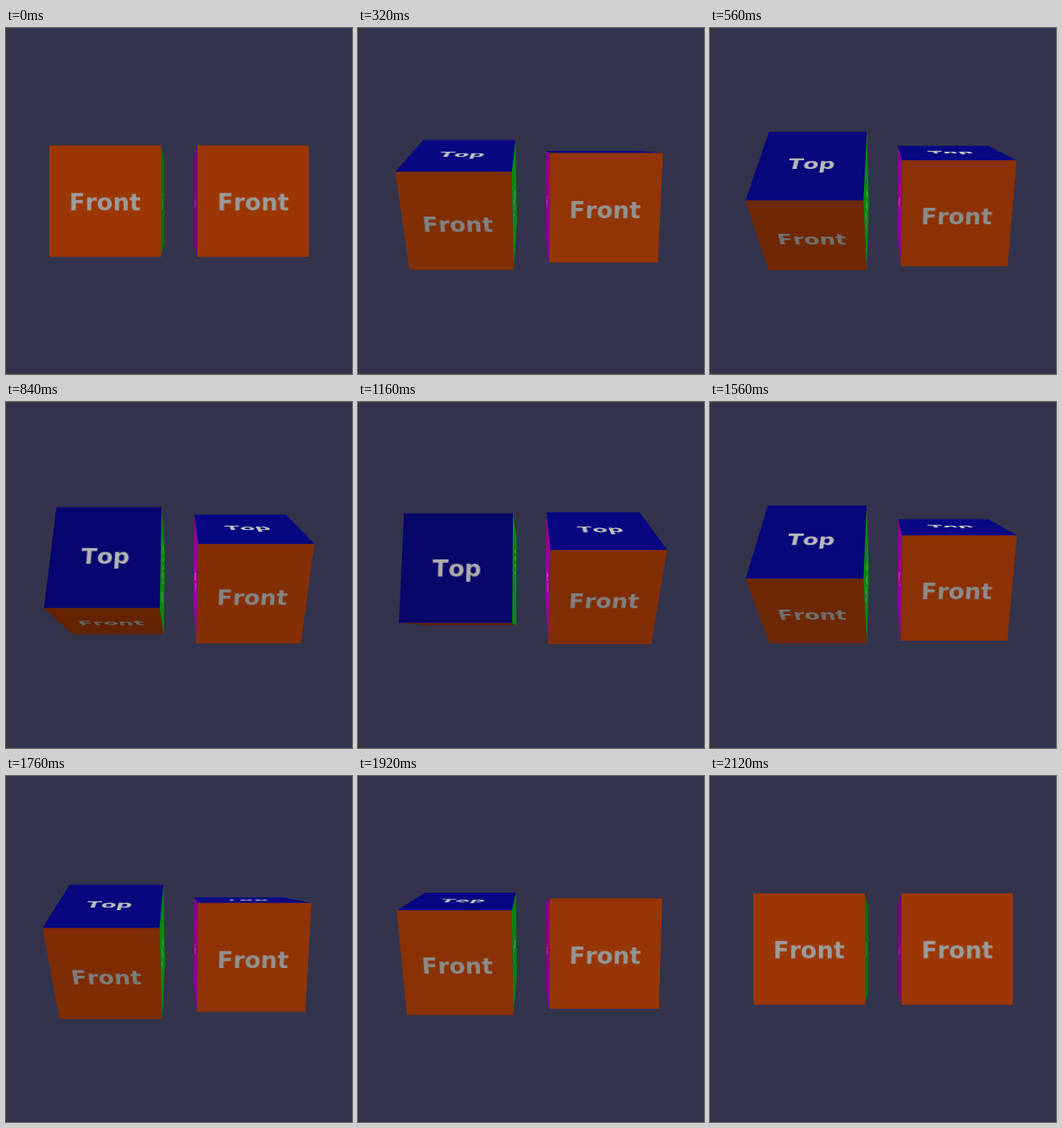
An HTML page for the animation above (2160 ms loop, 400 by 400 pixels).

```html
<!DOCTYPE html>
<html lang="en">
<head>
<meta charset="utf-8">
<title>Tilting cubes</title>
<style>
html, body { margin: 0; width: 100%; height: 100%; overflow: hidden; background: #33334c; }
#stage { position: absolute; left: 0; top: 0; width: 400px; height: 400px; overflow: hidden; perspective: 473.04px; }
.cube { position: absolute; left: 136px; top: 136px; width: 128px; height: 128px; transform-style: preserve-3d; }
.face {
  position: absolute; left: 0; top: 0; width: 128px; height: 128px;
  backface-visibility: hidden; text-align: center; white-space: nowrap;
  font: bold 27px/131px "DejaVu Sans", Verdana, sans-serif;
  font-kerning: none;
}
</style>
</head>
<body>
<div id="stage"></div>
<script>
const LOOP = 2160, STEP = 40;
const START = 38, PEAK = 1076, END = 2114, MAX_TILT = 89;
const GAP = 256 / 3, DEPTH = -62, HALF = 64;

// Brightness of each face and its label for the sine and cosine of the tilt
const frontLight = s => 0.61 - 0.24 * s;
const sideLight = s => 0.61 + 0.14 * Math.min(1, s / 0.35);
const FACES = [
  { label: 'Front', turn: '', rgb: [255, 90, 8], light: frontLight, ink: frontLight, alpha: 1 },
  { label: 'Top', turn: 'rotateX(90deg)', rgb: [10, 9, 160],
    light: (s, c) => 0.63 + 0.2 * c, ink: (s, c) => 0.66 + 0.1 * c, alpha: 1 },
  { label: 'Right', turn: 'rotateY(90deg)', rgb: [10, 182, 14], light: sideLight, ink: sideLight, alpha: 0.4 },
  { label: 'Left', turn: 'rotateY(-90deg)', rgb: [202, 0, 205], light: sideLight, ink: sideLight, alpha: 0.4 }
];

const stage = document.getElementById('stage');

function add(parent, name) {
  const el = document.createElement('div');
  el.className = name;
  return parent.appendChild(el);
}

function makeCube(x, share) {
  const el = add(stage, 'cube');
  const faces = FACES.map(f => {
    const face = add(el, 'face');
    face.textContent = f.label;
    face.style.transform = `${f.turn} translateZ(${HALF}px)`;
    return face;
  });
  return { el, faces, x, share };
}

const cubes = [makeCube(-GAP, 1), makeCube(GAP, 1 / 3)];

const shade = (rgb, k, alpha = 1) => `rgba(${rgb.map(v => Math.round(v * k)).join(',')},${alpha})`;

function tilt(t) {
  const p = t < PEAK ? (t - START) / (PEAK - START) : (END - t) / (END - PEAK);
  return MAX_TILT * Math.max(0, p);
}

function draw(now) {
  const t = Math.floor((now % LOOP) / STEP) * STEP;
  for (const cube of cubes) {
    const deg = tilt(t) * cube.share;
    const a = deg * Math.PI / 180;
    const s = Math.sin(a), c = Math.cos(a);
    cube.el.style.transform = `translate3d(${cube.x}px, 0, ${DEPTH}px) rotateX(${-deg}deg)`;
    FACES.forEach((f, i) => {
      const style = cube.faces[i].style;
      style.background = shade(f.rgb, f.light(s, c));
      style.color = shade([255, 255, 255], f.ink(s, c), f.alpha);
    });
  }
}

const begin = performance.now();
function tick() {
  draw(performance.now() - begin);
  requestAnimationFrame(tick);
}
tick();
</script>
</body>
</html>
```
